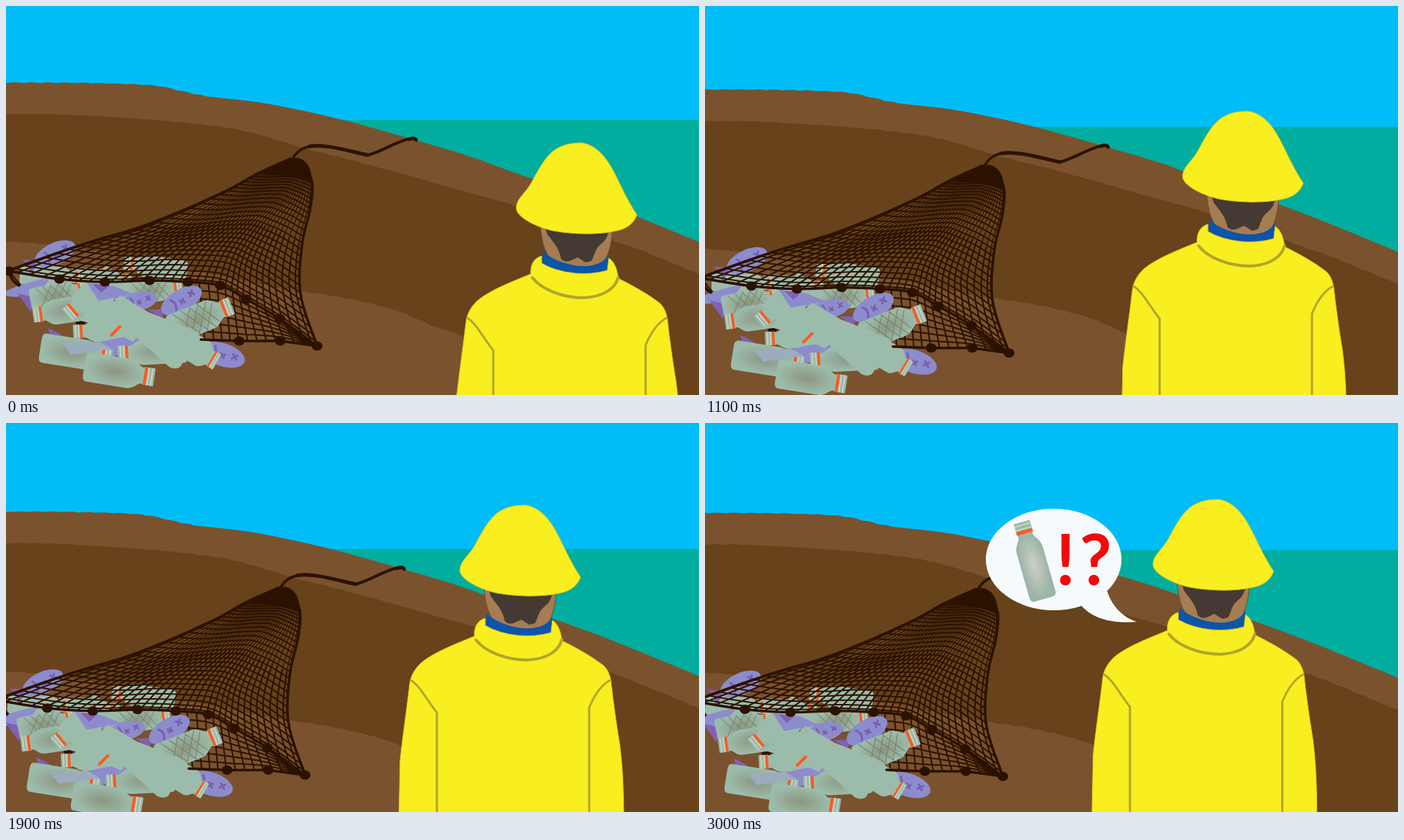
These frames come from a looping animation (960 by 540 pixels, 6 s). An HTML page:

```html
<!DOCTYPE html>
<html lang="en">
<head>
<meta charset="utf-8">
<title>Catch of the day</title>
<style>
html, body { margin: 0; width: 100%; height: 100%; overflow: hidden; background: #00bdf8; }
svg { display: block; width: 960px; height: 540px; }
.net { fill: none; stroke: #2b1200; stroke-linecap: round; stroke-linejoin: round; }
.seam { fill: none; stroke: #b0a52a; stroke-width: 3; stroke-linecap: round; }
text { font: 700 97px Lato, "Open Sans", sans-serif; fill: #f00a0a; text-anchor: middle; }
</style>
</head>
<body>
<svg viewBox="0 0 960 540">
  <defs>
    <radialGradient id="pale"><stop offset="0" stop-color="#cfcfc2"/><stop offset="1" stop-color="#9ab5a8"/></radialGradient>
    <radialGradient id="dim"><stop offset="0" stop-color="#8c9680"/><stop offset="1" stop-color="#9cbcab"/></radialGradient>
    <!-- Bottle lying along x, cap to the right, 108 by 37 -->
    <g id="bottle">
      <path d="M-48-18 L14-18 C24-18 28-12 34-10 L40-10 V10 L34 10 C28 12 24 18 14 18 L-48 18 Q-54 18-54 11 V-11 Q-54-18-48-18Z"/>
      <path fill="#9cb9a9" d="M37-11h17v22h-17z"/>
      <path fill="#ff5a1e" d="M38-11h4.5v22h-4.5z"/>
      <path fill="none" stroke="#d3ddd2" stroke-width="1.5" d="M44.5-11v22M50-11v22"/>
    </g>
    <path id="weave" fill="none" stroke="#74836c" stroke-width="1.2" d="M-40-17 L-10 17 M-26-17 L4 17 M-12-17 L18 17 M2-17 L26 12 M-10-17 L-40 17 M4-17 L-26 17 M18-17 L-12 17 M26-12 L2 17"/>
    <g id="fish">
      <path fill="#8061b4" d="M-24 0 L-48-13 L-41 0 L-48 13Z"/>
      <ellipse rx="32" ry="16" fill="#8c8ccd"/>
      <path fill="none" stroke="#7a5fb0" stroke-width="3" d="M13-6l8 8m0-8l-8 8M-3-2l7 7m0-7l-7 7M-14-9q8 9 0 18"/>
    </g>
  </defs>

  <g id="shore">
    <path fill="#00ad9f" d="M-10 158H1000V560H-10Z"/>
    <path id="hill" fill="#7b522e"/>
    <path id="band" fill="#67421a"/>
    <g class="net">
      <path stroke-width="3.5" d="M397 212 C404 200 414 193 435 194"/>
      <path stroke-width="5" d="M420 195 C440 191 470 200 501 207"/>
      <path stroke-width="4" d="M501 207 C520 203 545 185 562 184"/>
      <path stroke-width="5" d="M558 185 Q566 182 568 186"/>
      <path id="flap" stroke-width="2"/>
    </g>
    <g id="pile"></g>
    <g class="net">
      <path id="fine" stroke-width="1.2"/>
      <path id="coarse" stroke-width="2"/>
      <path id="edge" stroke-width="3.6"/>
      <path fill="#2b1200" stroke="none" d="M356 232 C376 220 392 209 405 211 C419 215 424 228 424 247 C406 236 382 236 356 232Z"/>
      <g id="knots" fill="#2b1200" stroke="none"></g>
    </g>
  </g>

  <g id="bubble">
    <ellipse cx="483" cy="189.5" rx="94" ry="70.5" fill="#f7fafc"/>
    <path fill="#f7fafc" d="M520 252 C535 270 560 279 598 276 C577 269 562 252 556 230Z"/>
    <use href="#bottle" fill="url(#pale)" transform="translate(454,191) rotate(-106) scale(1.03 1.04)"/>
    <text x="499.5 541" y="225">!?</text>
  </g>

  <g id="man">
    <path fill="#a67c52" stroke="#6b4a2c" d="M740 304 C742 325 745 338 753 350 Q790 372 829 355 C836 342 839 328 840 312Z"/>
    <path fill="#453933" d="M747 308 L750 317 C757 327 766 335 769 351 Q775 357 783 353 L792 349 L803 356 L811 354 C816 345 815 337 826 329 Q833 323 835 312Z"/>
    <path fill="#0c55a8" d="M744 340 C753 350 773 359 795 361 C815 362 827 357 835 345 L834 369 Q790 378 741 360Z"/>
    <path fill="#f9ee20" stroke="#d9c51e" d="M742 347 C731 350 726 360 727 372 C700 383 669 395 652 410 C642 420 638 430 637 440 C633 475 627 515 624 545 L622 640 H934 C934 580 932 550 928 520 C923 490 919 460 916 433 C914 424 911 417 905 412 C888 399 868 388 848 378 C847 365 842 354 835 350 L833 367 Q812 373 788 371 Q760 368 742 357Z"/>
    <path class="seam" style="stroke-width:4" d="M729 377 C742 394 772 405 800 405 C826 404 844 393 848 377"/>
    <path class="seam" d="M639 433 C652 441 659 458 675 478 V640 M915 433 C902 440 893 454 886 471 V640"/>
    <path fill="#f9ee20" stroke="#d9c51e" d="M707 282 C706 268 719 261 728 245 C736 230 744 215 753 206 C764 194 780 190 797 190 C815 192 829 207 838 223 C848 240 858 266 874 290 C870 301 861 309 846 312 C820 318 785 317 758 312 C735 307 709 294 707 282Z"/>
  </g>
</svg>

<script>
const $ = id => document.getElementById(id);
const mix = (a, b, t) => [a[0] + (b[0] - a[0]) * t, a[1] + (b[1] - a[1]) * t];
const pairs = s => s.split(' ').map(p => p.split(',').map(Number));

// Catmull-Rom point at t in 0..1
function along(pts, t) {
  const s = t * (pts.length - 1), i = Math.min(Math.floor(s), pts.length - 2), f = s - i;
  const at = n => pts[Math.max(0, Math.min(pts.length - 1, n))];
  const [a, b, c, d] = [at(i - 1), at(i), at(i + 1), at(i + 2)];
  return [0, 1].map(k => b[k] + f / 2 * (c[k] - a[k] + f * (2 * a[k] - 5 * b[k] + 4 * c[k] - d[k]
    + f * (3 * (b[k] - c[k]) + d[k] - a[k]))));
}
const trace = (fn, n = 28, end = 1) => 'M' + Array.from({ length: n + 1 }, (_, i) =>
  fn(i / n * end).map(v => v.toFixed(1)).join(' ')).join('L');
const rough = (pts, reach) => trace(t => {
  const [x, y] = along(pts, t);
  return [x, y - (x < reach ? Math.abs(Math.sin(x / 7.5)) : 0)];
}, 240);

// Hill
const crest = pairs('-10,107 70,107 140,108 205,111 245,119 275,125 345,133 400,143 470,159 570,187 643,209 709,233 789,260 861,287 960,327.5 1000,344');
const bandTop = pairs('-10,151 70,151 180,157 270,165 330,174 380,188 420,200 480,215 550,234 620,254 706,278 780,303 840,326 880,340 960,373 1000,389');
const bandLow = pairs('-10,327 60,332 150,345 250,365 330,382 405,396 470,406 540,423 592,445 640,463 800,540 860,570');
$('hill').setAttribute('d', rough(crest, 275) + 'V570H-10Z');
$('band').setAttribute('d', rough(bandTop, 1000) + 'V570H860L' +
  rough(bandLow.slice().reverse(), 1000).slice(1) + 'Z');

// Net: a patch between two sides and the rim, gathered at the top
const left = pairs('4,367 100,333 200,302 300,259 350,232 394,212');
const right = pairs('431,472 408,400 410,332 422,278 423,240 405,213');
const rim = pairs('4,368 74,379 137,383 199,381 252,383 297,388 333,407 379,434 431,472');
const floor = pairs('4,368 40,406 103,437 200,457 270,463 323,465 380,465 431,472');
const mesh = (u, v) => {
  const [x, y] = mix(along(left, v), along(right, v), u);
  const r = along(rim, u), c = mix(left[0], right[0], u), pull = (1 - v) ** 1.5;
  return [x + pull * (r[0] - c[0]), y + pull * (r[1] - c[1])];
};
let fine = '', coarse = '', flap = trace(t => along(floor, t));
for (let i = 0; i <= 34; i++) {
  fine += trace(v => mesh(i / 34, v));
  coarse += trace(v => mesh(i / 34, v), 12, 0.4) + trace(u => mesh(u, i / 34));
}
const lip = t => along(rim, 0.47 + 0.53 * t), base = t => along(floor, 0.52 + 0.48 * t);
for (let i = 0; i <= 15; i++) flap += trace(t => mix(lip(i / 15), base(i / 15), t), 1);
for (let i = 1; i <= 7; i++) flap += trace(t => mix(lip(t), base(t), i / 7));
$('fine').setAttribute('d', fine);
$('coarse').setAttribute('d', coarse);
$('flap').setAttribute('d', flap);
$('edge').setAttribute('d', [left, right, rim].map(p => trace(t => along(p, t))).join('') +
  'M4 368Q7 382 18 388M270 463L323 465L380 465L431 472');
$('knots').innerHTML = [...rim, [323, 465], [380, 465]].map(([x, y]) =>
  `<ellipse cx="${x}" cy="${y}" rx="7.5" ry="6.5"/>`).join('');

// Pile
const put = (id, x, y, turn, sx, sy, more = '') =>
  `<use href="#${id}" transform="translate(${x},${y}) rotate(${turn}) scale(${sx} ${sy})" ${more}/>`;
const bottle = (x, y, turn, len, wide, fill = '#9cbcab') =>
  put('bottle', x, y, turn, len / 108, wide / 37, `fill="${fill}"`);
const netted = (x, y, turn, len, wide) =>
  bottle(x, y, turn, len, wide, 'url(#dim)') + put('weave', x, y, turn, len / 108, wide / 37);
const fish = (x, y, turn, size = 1) => put('fish', x, y, turn, size, size);
const bit = (d, fill = '#8061b4') => `<path fill="${fill}" d="${d}"/>`;
$('pile').innerHTML = [
  '<circle cx="103" cy="437" r="7" fill="#2b1200"/>',
  bottle(207, 363, 189, 88, 32),
  bottle(132, 376, 4, 84, 22),
  bottle(64, 375, 3, 90, 28),
  fish(68, 344, -25, 0.95),
  bit('M0 396Q22 384 62 377Q52 391 42 400L34 424L20 403Q8 405 0 402Z', '#8c8ccd'),
  bit('M16 399L34 424L38 404Z'),
  bottle(160, 394, 8, 82, 30),
  netted(205, 395, -8, 80, 32),
  netted(73, 401, -12, 80, 34),
  fish(243, 409, -30, 0.98),
  bottle(80, 423, 172, 86, 36, 'url(#dim)'),
  bottle(118, 401, 140, 88, 36),
  bit('M112 384L150 389L176 400L130 412Z', '#8c8ccd'),
  bit('M120 386L144 387L132 398Z'),
  fish(184, 410, -12, 0.8),
  netted(270, 433, -22, 92, 42),
  bottle(137, 450, 177, 88, 32),
  fish(300, 484, 18),
  bit('M58 447Q76 454 88 466L62 460Z'),
  bit('M112 474Q140 460 196 456L170 482L120 492Z', '#8c8ccd'),
  bottle(97, 482, 9, 100, 42, 'url(#dim)'),
  bit('M78 468L130 466L146 476L90 484Z', '#9cacbf'),
  bottle(203, 480, 177, 96, 36, 'url(#dim)'),
  bit('M170 459Q184 449 198 453L188 462Z'),
  bit('M158 402L206 430L176 466L120 438Z', '#9cbcab'),
  bit('M150 405L114 412L104 437L140 448Z', '#9cbcab'),
  bottle(265, 478, 31, 64, 40),
  bit('M200 426L258 449Q266 456 262 466L242 500Q236 506 226 501L174 454Z', '#9cbcab'),
  '<path stroke="#ff5a1e" stroke-width="4" d="M145 458L159 444"/>',
  bottle(157, 508, 9, 98, 42, 'url(#dim)')
].join('');

function draw(now) {
  const step = Math.floor(now % 6000 / 100);
  const go = Math.min(step, 21) / 21;
  $('shore').setAttribute('transform', `translate(${-18.5 * go},${18.5 * go})`);
  $('man').setAttribute('transform', `translate(${-86.3 * go},${-84 * go})`);
  $('bubble').setAttribute('opacity', step < 22 ? 0 : Math.min(1, 0.22 + 0.78 * (step - 22) / 8));
  requestAnimationFrame(draw);
}
draw(performance.now());
</script>
</body>
</html>
```
